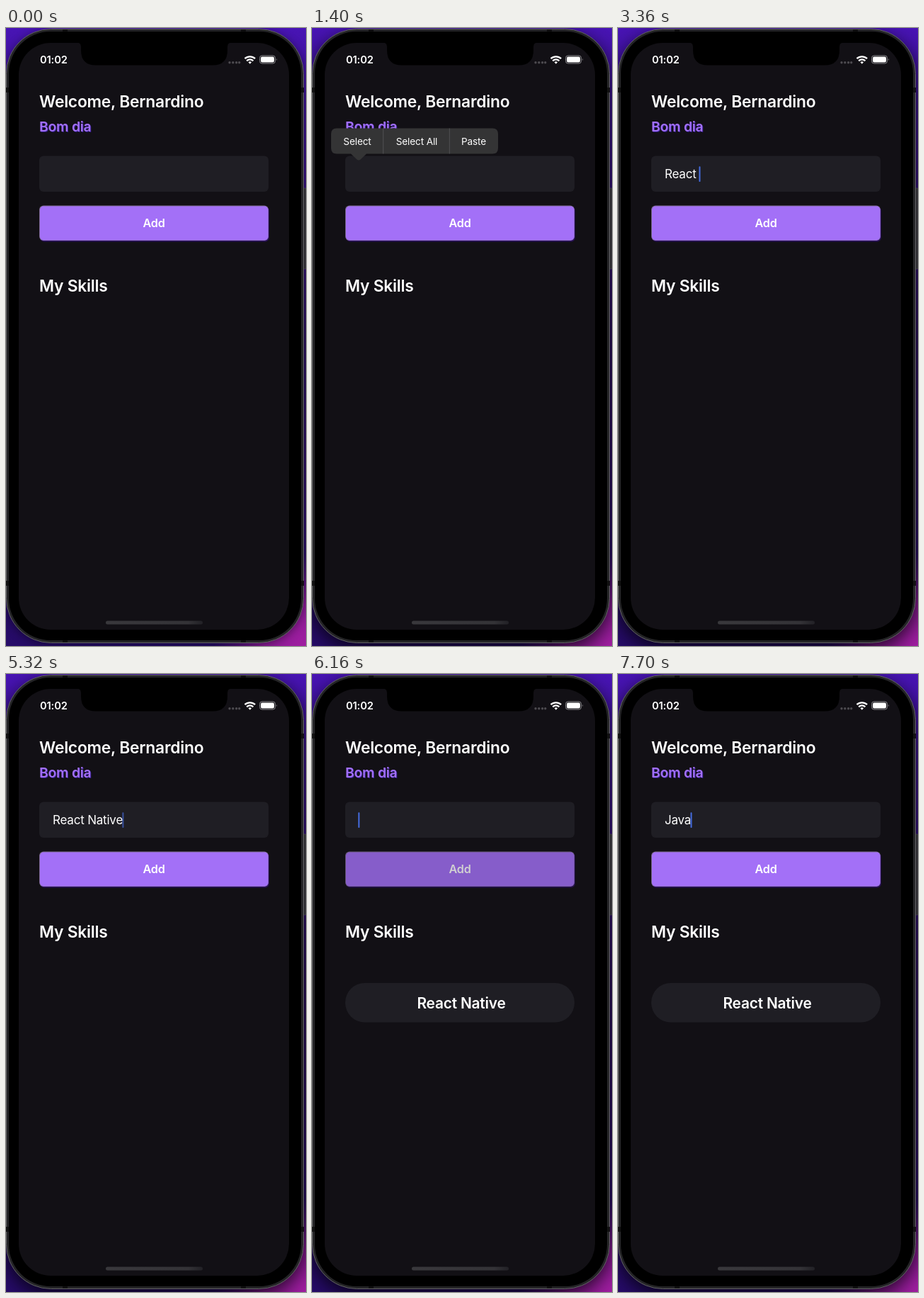
Animation, 424 px wide and 872 px high, one loop 8000 ms. Source, as an HTML page:

```html
<!DOCTYPE html>
<html lang="en">
<head>
<meta charset="utf-8">
<title>My Skills</title>
<style>
html, body { margin: 0; width: 100%; height: 100%; overflow: hidden; background: #000; }
svg { display: block; width: 424px; height: 872px; }
text { font-family: Inter, Roboto, sans-serif; fill: #fff; letter-spacing: -.01em; white-space: pre; }
.bold { font-weight: 600; }
.mid { text-anchor: middle; }
.title { font-size: 22.8px; }
#typed { font-size: 17px; letter-spacing: -.012em; }
#menu text { font-size: 13.6px; }
#soft { filter: blur(7px); opacity: .45; }
#deep { filter: blur(13px); opacity: .75; }
</style>
</head>
<body>
<svg viewBox="0 0 424 872">
  <defs>
    <linearGradient id="desk" x2="0" y2="1">
      <stop offset="0" stop-color="#4814b4"/>
      <stop offset=".12" stop-color="#3a1190"/>
      <stop offset=".5" stop-color="#2a0f5c"/>
      <stop offset="1" stop-color="#260b68"/>
    </linearGradient>
    <radialGradient id="glow" gradientUnits="userSpaceOnUse" cx="424" cy="872" r="130">
      <stop offset="0" stop-color="#a01ea0"/>
      <stop offset=".45" stop-color="#8c1b98"/>
      <stop offset="1" stop-color="#7a1788" stop-opacity="0"/>
    </radialGradient>
    <linearGradient id="bar">
      <stop offset="0" stop-color="#39383c"/>
      <stop offset=".85" stop-color="#343337"/>
      <stop offset="1" stop-color="#222126"/>
    </linearGradient>
  </defs>

  <!-- desktop, window shadow and phone body -->
  <rect width="424" height="872" fill="url(#desk)"/>
  <rect width="424" height="872" fill="url(#glow)"/>
  <rect id="soft" y="4" width="421" height="866" rx="64"/>
  <rect id="deep" y="10" width="421" height="866" rx="64"/>
  <rect x="419" y="226" width="5" height="114" rx="1" fill="#2c2b2f" stroke="#4a494e" stroke-width=".6"/>
  <rect x=".5" y="1.5" width="420" height="866" rx="63" fill="#242426" stroke="#626265"/>
  <path d="M80 4h7M332 4h7M80 865h7M332 865h7M2 84v7M2 780v7M419 84v7M419 780v7" stroke="#111" stroke-width="4"/>
  <rect x="4" y="5" width="413" height="859" rx="59"/>
  <rect x="18" y="21" width="382" height="828" rx="45" fill="#121015"/>
  <path d="M100 20.5q6 0 6 6v5q0 21 21 21h165q21 0 21-21v-5q0-6 6-6z"/>

  <!-- status bar -->
  <text class="bold" x="48" y="50.3" font-size="14.7">01:02</text>
  <path d="M316 48.8h.01m4.8 0h.01m4.8 0h.01m4.1 0h.01" stroke="#4d4b50" stroke-width="3.4" stroke-linecap="round"/>
  <g fill="none" stroke="#fff" stroke-width="2.3">
    <path d="M337.5 43.2a10.6 10.6 0 0 1 14.6 0M340.2 46.3a6.7 6.7 0 0 1 9.2 0"/>
    <path d="M344.8 50.8l-2.3-2.5a3.4 3.4 0 0 1 4.6 0z" fill="#fff" stroke="none"/>
  </g>
  <rect x="358.5" y="39" width="22" height="11" rx="3.3" fill="none" stroke="#8b8a8e"/>
  <rect x="360" y="40.5" width="19" height="8" rx="2" fill="#fff"/>
  <path d="M382 42.8q1.6 1.7 0 3.4z" fill="#8b8a8e"/>

  <!-- page -->
  <text class="bold title" x="47" y="112">Welcome, Bernardino</text>
  <g class="bold" font-size="19.3">
    <text x="48" y="147" style="fill:#35208a">Bom dia</text>
    <text x="47" y="146" style="fill:#a370f7">Bom dia</text>
  </g>
  <rect x="47" y="180.5" width="324" height="50.5" rx="6" fill="#1f1e24"/>
  <text id="typed" x="66" y="212"></text>
  <rect id="caret" y="195.3" width="2" height="21.7" rx=".8" fill="#456ce0"/>
  <g id="button">
    <rect x="48" y="252" width="324" height="49.5" rx="6" fill="#29105c"/>
    <rect x="47" y="250.5" width="324" height="49.5" rx="6" fill="#7d6a92"/>
    <rect x="48" y="251.5" width="322.5" height="48" rx="5" fill="#a370f7"/>
    <text class="bold mid" x="209" y="281.3" font-size="16.2">Add</text>
  </g>
  <text class="bold title" x="47" y="372">My Skills</text>
  <g id="skill">
    <rect x="47" y="436" width="324" height="55.5" rx="27.7" fill="#1f1e24"/>
    <text class="bold mid" x="211" y="471.7" font-size="20.9">React Native</text>
  </g>
  <rect x="141" y="836.5" width="137" height="5" rx="2.5" fill="url(#bar)"/>

  <!-- edit menu -->
  <g id="menu">
    <path d="M35 141.5h220q8 0 8 8v20q0 8-8 8H77l-8.5 8q-2.5 2-5 0l-8.5-8H35q-8 0-8-8v-20q0-8 8-8z" fill="#343435"/>
    <path d="M100.7 141.5v36M194.3 141.5v36" stroke="#555457" stroke-width=".9"/>
    <text class="mid" x="64" y="164.5">Select</text>
    <text class="mid" x="148" y="164.5">Select All</text>
    <text class="mid" x="228.5" y="164.5">Paste</text>
  </g>
</svg>
<script>
const LOOP = 8000, STEP = 70;
const [soft, deep, typed, caret, button, skill, menu] =
  ["soft", "deep", "typed", "caret", "button", "skill", "menu"].map(id => document.getElementById(id));

// [time, word, characters shown]
const keys = [
  [0, "", 0], [2100, "React Native", 2], [2450, "React Native", 3], [2800, "React Native", 4],
  [3080, "React Native", 5], [3360, "React Native", 6], [3850, "React Native", 7],
  [3990, "React Native", 8], [4340, "React Native", 9], [4410, "React Native", 10],
  [4620, "React Native", 11], [4760, "React Native", 12], [6090, "", 0],
  [7140, "Java", 1], [7350, "Java", 2], [7560, "Java", 3], [7700, "Java", 4]
];

// Rises from 0 to 1 in screen steps, reaching 1 at time b.
const ramp = (t, a, b) => Math.min(1, Math.max(0, (t - a + STEP) / (b - a + STEP)));

function draw(t) {
  const r = (a, b = a) => ramp(t, a, b);
  const [, word, count] = keys.findLast(k => k[0] <= t);
  typed.textContent = word.slice(0, count);
  caret.setAttribute("x", 65.3 + (count ? typed.getComputedTextLength() : 0));
  caret.style.opacity = r(980) - r(1260, 1400) + r(1680, 1820)
    - r(5320, 5460) + r(5670, 5810) - r(6650, 6790) + r(7070, 7140);
  menu.style.opacity = r(980, 1400) - r(1680, 1890);
  button.style.opacity = 1 - .39 * (r(5950) - r(6090, 6300));
  skill.style.opacity = t >= 6090 ? 1 : 0;

  // the window gains focus, so its shadow deepens
  const focused = t >= 630;
  soft.style.display = focused ? "none" : "";
  deep.style.display = focused ? "" : "none";
}

const start = performance.now();
function tick() {
  const t = (performance.now() - start) % LOOP;
  draw(Math.floor(t / STEP) * STEP);
  requestAnimationFrame(tick);
}
tick();
</script>
</body>
</html>
```
